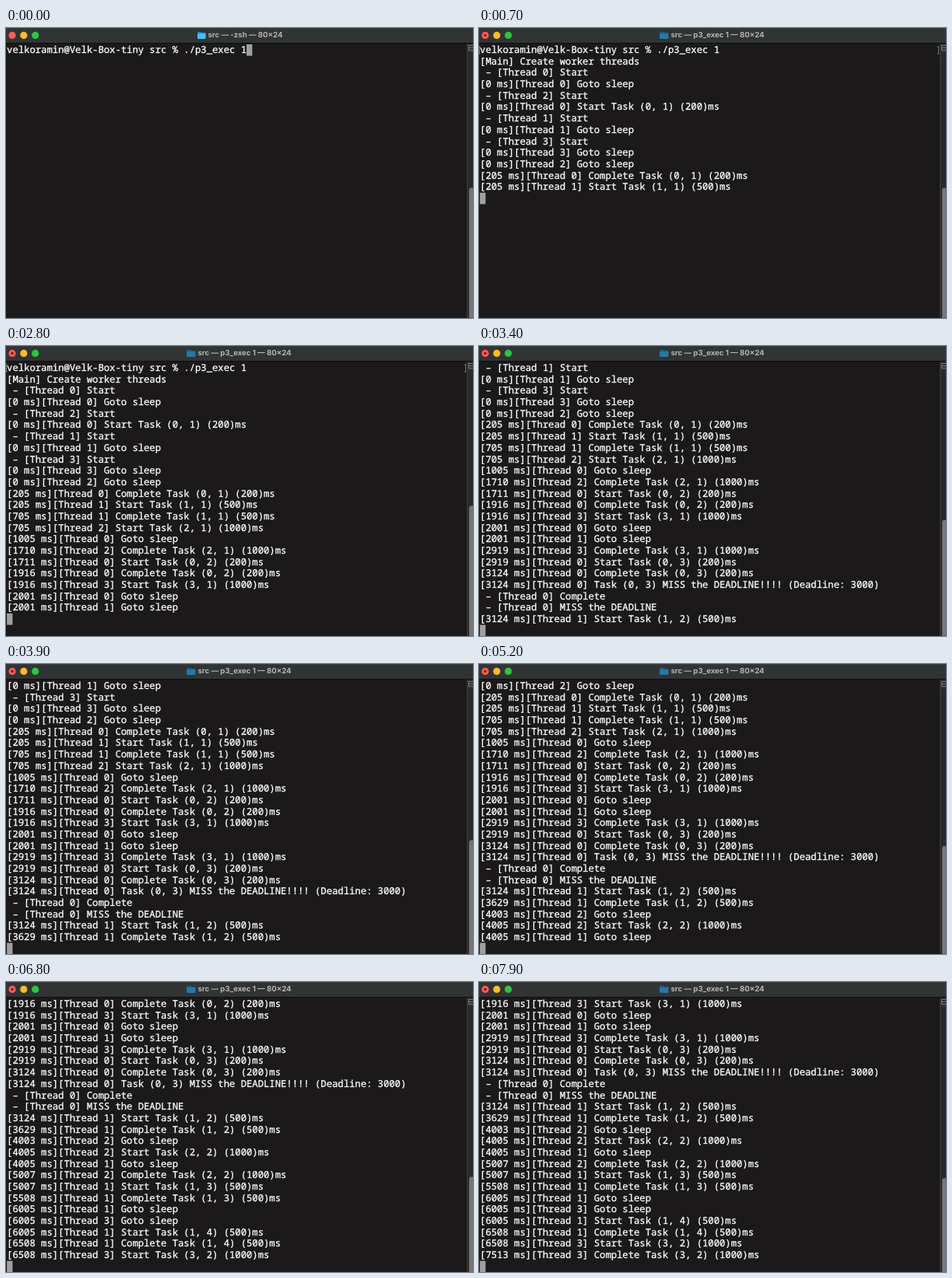
Recreate the animation shown at these times as an HTML page with a canvas. Size 600 by 373 pixels, loop 8 s.

```html
<!DOCTYPE html>
<html lang="en">
<head>
<meta charset="utf-8">
<title>Terminal</title>
<style>
  html, body { margin: 0; width: 100%; height: 100%; overflow: hidden; background: #1b191a; }
  #stage { position: relative; width: 600px; height: 373px; overflow: hidden; }
  canvas { position: absolute; left: 0; top: 0; width: 600px; height: 373px; }
  #out {
    position: absolute; left: 1.1px; top: 21px; margin: 0; color: #fff;
    font: 400 12.22px/14.68px "Noto Sans Mono", "DejaVu Sans Mono", monospace;
    -webkit-text-stroke: 0.3px #fff;
    font-variant-ligatures: none; white-space: pre;
    text-rendering: geometricPrecision;
  }
  #title {
    position: absolute; top: 3px; color: #b4b5b6; white-space: pre;
    font: 700 9.6px/13px Inter, "Open Sans", sans-serif;
    text-rendering: geometricPrecision;
  }
</style>
</head>
<body>
<div id="stage">
  <canvas id="view"></canvas>
  <div id="title"></div>
  <pre id="out"></pre>
</div>
<script>
const LOOP = 8000, ROWS = 24, PITCH = 14.68, CHAR = 7.332, TOP = 21, LEFT = 1.1;
const ENTER = 200, RETITLE = 400;
const PROMPT = 'velkoramin@Velk-Box-tiny src % ./p3_exec 1';
const COST = [200, 500, 1000, 1000];

const stamp = (ms, th) => `[${ms} ms][Thread ${th}] `;
const sleep = (ms, th) => stamp(ms, th) + 'Goto sleep';
const task = verb => (ms, th, n) => stamp(ms, th) + `${verb} Task (${th}, ${n}) (${COST[th]})ms`;
const start = task('Start'), done = task('Complete');
const note = (th, text) => ` – [Thread ${th}] ${text}`;

// Each burst of output: time, then its lines
const bursts = [
  [300, '[Main] Create worker threads', note(0, 'Start'), sleep(0, 0), note(2, 'Start'),
    start(0, 0, 1), note(1, 'Start'), sleep(0, 1), note(3, 'Start'), sleep(0, 3), sleep(0, 2)],
  [500, done(205, 0, 1), start(205, 1, 1)],
  [1000, done(705, 1, 1), start(705, 2, 1)],
  [1300, sleep(1005, 0)],
  [2000, done(1710, 2, 1), start(1711, 0, 2)],
  [2200, done(1916, 0, 2), start(1916, 3, 1)],
  [2300, sleep(2001, 0), sleep(2001, 1)],
  [3200, done(2919, 3, 1), start(2919, 0, 3)],
  [3400, done(3124, 0, 3), stamp(3124, 0) + 'Task (0, 3) MISS the DEADLINE!!!! (Deadline: 3000)',
    note(0, 'Complete'), note(0, 'MISS the DEADLINE'), start(3124, 1, 2)],
  [3900, done(3629, 1, 2)],
  [4300, sleep(4003, 2), start(4005, 2, 2), sleep(4005, 1)],
  [5300, done(5007, 2, 2), start(5007, 1, 3)],
  [5800, done(5508, 1, 3)],
  [6300, sleep(6005, 1), sleep(6005, 3), start(6005, 1, 4)],
  [6800, done(6508, 1, 4), start(6508, 3, 2)],
  [7800, done(7513, 3, 2)]
];

const view = document.getElementById('view');
const out = document.getElementById('out');
const title = document.getElementById('title');
const ctx = view.getContext('2d');
const scale = window.devicePixelRatio || 1;
view.width = 600 * scale;
view.height = 373 * scale;
ctx.scale(scale, scale);

function box(x, y, w, h, color) {
  ctx.fillStyle = color;
  ctx.fillRect(x, y, w, h);
}

function round(x, y, w, h, r, color) {
  ctx.fillStyle = color;
  ctx.beginPath();
  ctx.roundRect(x, y, w, h, r);
  ctx.fill();
}

function dot(x, y, r, color) {
  ctx.fillStyle = color;
  ctx.beginPath();
  ctx.arc(x, y, r, 0, Math.PI * 2);
  ctx.fill();
}

function bracket(x, lip) {
  box(x, 23.5, 1, 10, '#777');
  box(lip, 23.5, 2, 1, '#777');
  box(lip, 32.5, 2, 1, '#777');
}

function folder(x, back, front, alpha) {
  ctx.globalAlpha = alpha;
  round(x, 5, 5, 4, 1, back);
  round(x, 6, 10.5, 8, 1, back);
  round(x, 7.3, 10.5, 6.7, 1, front);
  ctx.globalAlpha = 1;
}

function bar(running, fade) {
  box(0, 0, 600, 19, '#313435');
  box(0, 0, 600, 1, '#3a3d3e');
  box(0, 19, 600, 1, '#0f0f0f');
  ['#ff5b52', '#f8bb2e', '#2bc640'].forEach((c, i) => dot(8 + i * 14.8, 9.4, 4.6, c));
  if (running) dot(8, 9.4, 1.6, '#7d100c');
  const x = running ? 232.6 : 246;
  folder(x, '#1d8fc9', '#48bdf4', 1);
  folder(x, '#1b6188', '#2779a4', fade);
}

function scroller(hidden) {
  box(592, 20, 8, 353, '#2b2a2a');
  box(592, 20, 1, 353, '#3d3b3b');
  ctx.strokeStyle = '#7d7c7c';
  ctx.lineWidth = 1;
  ctx.strokeRect(594.5, 22.5, 6, 6);
  box(595, 25, 5, 1, '#7d7c7c');
  box(592, 30, 8, 1, '#3d3b3b');
  const h = 342 * ROWS / (49 + hidden);
  round(595, 373 - h, 6, h + 4, 3, '#777575');
}

function setText(el, text) {
  if (el.textContent !== text) el.textContent = text;
}

function draw(t) {
  const lines = [PROMPT];
  for (const [at, ...text] of bursts) if (t >= at) lines.push(...text);
  const entered = t >= ENTER, running = t >= RETITLE;
  const hidden = Math.max(0, lines.length + 1 - ROWS);

  box(0, 0, 600, 373, '#1b191a');
  bar(running, Math.min(1, Math.max(0, (t - RETITLE) / 300)));
  scroller(hidden);
  if (entered && !hidden) {
    bracket(0, 0);
    bracket(590, 588.5);
  }
  const row = entered ? lines.length - hidden : 0;
  const col = entered ? 0 : PROMPT.length;
  box(LEFT + col * CHAR, TOP + row * PITCH, CHAR, PITCH, '#a09f9f');

  setText(out, lines.slice(hidden).join('\n'));
  setText(title, `src — ${running ? 'p3_exec 1' : '-zsh'} — 80×24`);
  title.style.left = (running ? 246.5 : 259.5) + 'px';
}

const begin = performance.now();
function tick() {
  draw((performance.now() - begin) % LOOP);
  requestAnimationFrame(tick);
}
tick();
</script>
</body>
</html>
```
